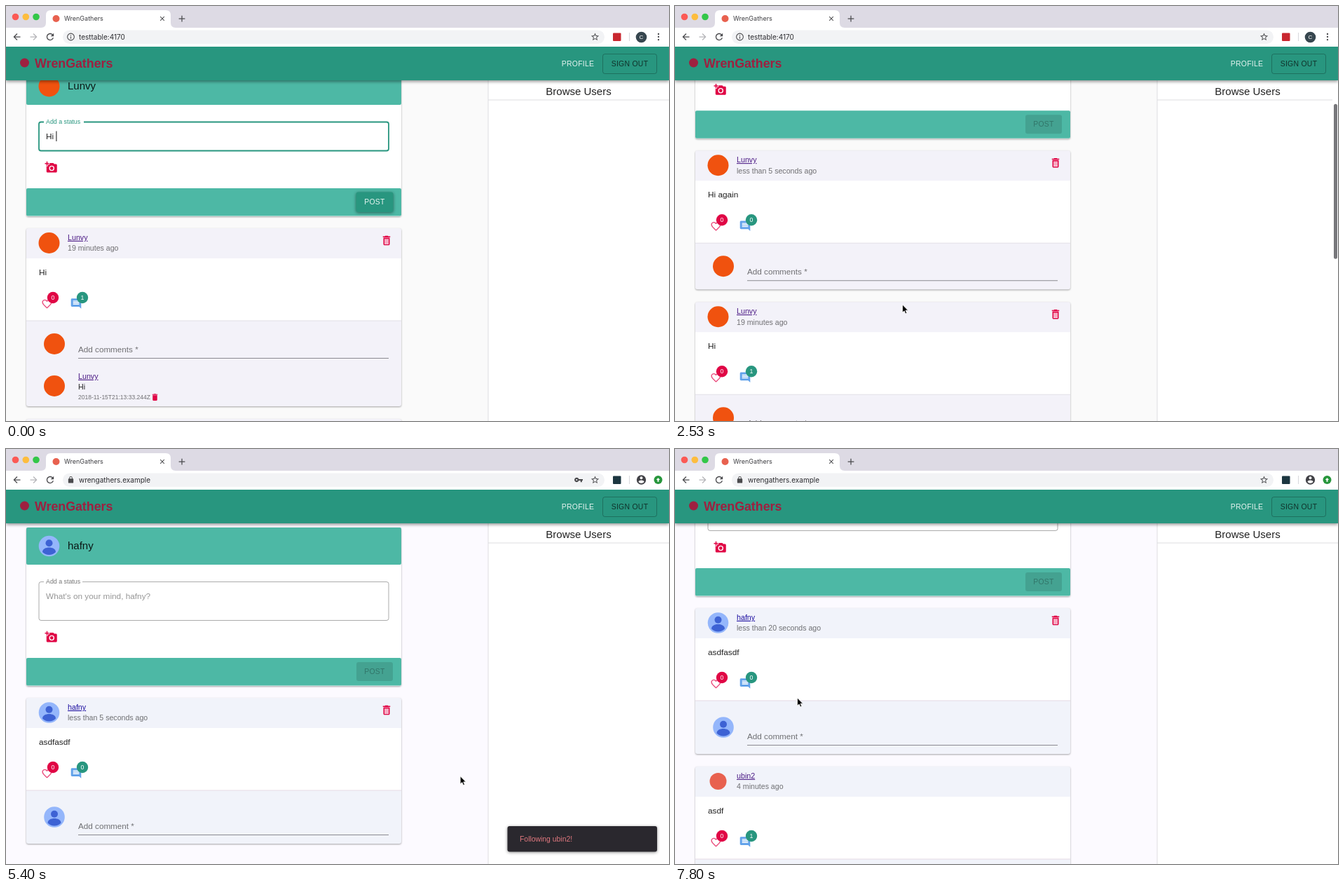
Recreate the animation shown at these times as an HTML page. Size 946x592 px, loop 8000 ms.

```html
<!DOCTYPE html>
<html lang="en">
<head>
<meta charset="utf-8">
<title>Feed</title>
<style>
html, body { margin: 0; height: 100%; overflow: hidden; background: #fff; }
svg { display: block; width: 100vw; height: 100vh; font-family: "Liberation Sans", Arial, sans-serif; }
text { white-space: pre; }
.ui { font-family: Inter, sans-serif; }
.card { filter: drop-shadow(0 1px 1px rgba(0,0,0,.35)); }
.raised { filter: drop-shadow(0 1px 2px rgba(0,0,0,.45)); }
.bar { filter: drop-shadow(0 2px 2px rgba(0,0,0,.4)); }
</style>
</head>
<body>
<svg id="stage" viewBox="0 0 946 592"></svg>
<script>
const LOOP = 8000, CUT = 2700, POSTED = 1330, FOLLOWED = 3800, RELOAD = 5500, BLANK = 6000, LOADED = 6200;
const TEAL = '#28967f', MINT = '#4db8a5', PINK = '#e00545', INK = 'rgba(0,0,0,.87)', GREY = 'rgba(0,0,0,.54)';
const BRAND = 'WrenGathers', SITE = 'wrengathers.example';
const stage = document.getElementById('stage');

const users = {
  lunvy: { name: 'Lunvy', link: '#4b1a85', dot: '#f0520f' },
  hafny: { name: 'hafny', link: '#1d0fa0' },
  ubin2: { name: 'ubin2', link: '#4b1a85', dot: '#e8614f' }
};

// 24-unit icons
const icons = {
  back: 'M20 11H7.83l5.59-5.59L12 4l-8 8 8 8 1.41-1.41L7.83 13H20v-2z',
  next: 'M4 11h12.17l-5.59-5.59L12 4l8 8-8 8-1.41-1.41L16.17 13H4v-2z',
  reload: 'M17.65 6.35C16.2 4.9 14.21 4 12 4c-4.42 0-7.99 3.58-7.99 8s3.57 8 7.99 8c3.73 0 6.84-2.55 7.73-6h-2.08c-.82 2.33-3.04 4-5.65 4-3.31 0-6-2.69-6-6s2.69-6 6-6c1.66 0 3.14.69 4.22 1.78L13 11h7V4l-2.35 2.35z',
  close: 'M19 6.41L17.59 5 12 10.59 6.41 5 5 6.41 10.59 12 5 17.59 6.41 19 12 13.41 17.59 19 19 17.59 13.41 12z',
  plus: 'M19 13h-6v6h-2v-6H5v-2h6V5h2v6h6v2z',
  info: 'M11 17h2v-6h-2v6zm1-15a10 10 0 1 0 0 20 10 10 0 0 0 0-20zm0 18a8 8 0 1 1 0-16 8 8 0 0 1 0 16zM11 9h2V7h-2v2z',
  lock: 'M18 8h-1V6a5 5 0 0 0-10 0v2H6c-1.1 0-2 .9-2 2v10c0 1.1.9 2 2 2h12c1.1 0 2-.9 2-2V10c0-1.1-.9-2-2-2zM15 8H9V6a3 3 0 0 1 6 0v2z',
  star: 'M22 9.24l-7.19-.62L12 2 9.19 8.63 2 9.24l5.46 4.73L5.82 21 12 17.27 18.18 21l-1.63-7.03L22 9.24zM12 15.4l-3.76 2.27 1-4.28-3.32-2.88 4.38-.38L12 6.1l1.71 4.04 4.38.38-3.32 2.88 1 4.28L12 15.4z',
  key: 'M12.65 10C11.83 7.67 9.61 6 7 6c-3.31 0-6 2.69-6 6s2.69 6 6 6c2.61 0 4.83-1.67 5.65-4H17v4h4v-4h2v-4H12.65zM7 14c-1.1 0-2-.9-2-2s.9-2 2-2 2 .9 2 2-.9 2-2 2z',
  account: 'M12 2a10 10 0 1 0 0 20 10 10 0 0 0 0-20zm0 3a3 3 0 1 1 0 6 3 3 0 0 1 0-6zm0 14.2c-2.5 0-4.71-1.28-6-3.22.03-1.99 4-3.08 6-3.08 1.99 0 5.97 1.09 6 3.08-1.29 1.94-3.5 3.22-6 3.22z',
  dots: 'M12 3a2 2 0 1 0 0 4 2 2 0 0 0 0-4zm0 7a2 2 0 1 0 0 4 2 2 0 0 0 0-4zm0 7a2 2 0 1 0 0 4 2 2 0 0 0 0-4z',
  up: 'M4 12l8-8 8 8h-5v8H9v-8z',
  bin: 'M6 19c0 1.1.9 2 2 2h8c1.1 0 2-.9 2-2V7H6v12zM19 4h-3.5l-1-1h-5l-1 1H5v2h14V4z',
  binLine: 'M6 19c0 1.1.9 2 2 2h8c1.1 0 2-.9 2-2V7H6v12zM8 9h8v10H8V9zm7.5-5l-1-1h-5l-1 1H5v2h14V4z',
  heart: 'M16.5 3c-1.74 0-3.41.81-4.5 2.09C10.91 3.81 9.24 3 7.5 3 4.42 3 2 5.42 2 8.5c0 3.78 3.4 6.86 8.55 11.54L12 21.35l1.45-1.32C18.6 15.36 22 12.28 22 8.5 22 5.42 19.58 3 16.5 3zm-4.4 15.55l-.1.1-.1-.1C7.14 14.24 4 11.39 4 8.5 4 6.5 5.5 5 7.5 5c1.54 0 3.04.99 3.57 2.36h1.87C13.46 5.99 14.96 5 16.5 5c2 0 3.5 1.5 3.5 3.5 0 2.89-3.14 5.74-7.9 10.05z',
  chat: 'M21.99 4c0-1.1-.89-2-1.99-2H4c-1.1 0-2 .9-2 2v12c0 1.1.9 2 2 2h14l4 4-.01-18zM18 14H6v-2h12v2zm0-3H6V9h12v2zm0-3H6V6h12v2z',
  camera: 'M3 4V1h2v3h3v2H5v3H3V6H0V4h3zm3 6V7h3V4h7l1.83 2H21c1.1 0 2 .9 2 2v12c0 1.1-.9 2-2 2H5c-1.1 0-2-.9-2-2V10h3zm7 9a5 5 0 1 0 0-10 5 5 0 0 0 0 10zm-3.2-5a3.2 3.2 0 1 0 6.4 0 3.2 3.2 0 0 0-6.4 0z',
  badge: 'M3 5v14c0 1.1.89 2 2 2h14c1.1 0 2-.9 2-2V5c0-1.1-.9-2-2-2H5c-1.11 0-2 .9-2 2zm12 4a3 3 0 1 1-6 0 3 3 0 0 1 6 0zm-9 8c0-2 4-3.1 6-3.1s6 1.1 6 3.1v1H6v-1z'
};

const rect = (x, y, w, h, fill, more = '') => `<rect x="${x}" y="${y}" width="${w}" height="${h}" fill="${fill}" ${more}/>`;
const disc = (x, y, r, fill) => `<circle cx="${x}" cy="${y}" r="${r}" fill="${fill}"/>`;
// y is the middle of the capitals
const text = (x, y, s, size, fill = INK, more = '') =>
  `<text x="${x}" y="${y + size * .36}" font-size="${size}" fill="${fill}" ${more}>${s}</text>`;
const caps = (x, y, s, fill) => text(x, y, s, 10.4, fill, 'letter-spacing=".3" text-anchor="middle"');
const icon = (name, x, y, size, fill) =>
  `<path d="${icons[name]}" fill="${fill}" fill-rule="evenodd" transform="translate(${x - size / 2} ${y - size / 2}) scale(${size / 24})"/>`;

const pen = document.createElement('canvas').getContext('2d');
const measure = (s, size) => {
  pen.font = `${size}px "Liberation Sans", Arial, sans-serif`;
  return pen.measureText(s).width;
};

const ramp = (t, a, b) => Math.min(1, Math.max(0, (t - a) / (b - a)));
const ease = k => k * k * (3 - 2 * k);
// keys: [time, ...values]
function track(t, keys, curve = ease) {
  let i = 0;
  while (i < keys.length - 2 && t >= keys[i + 1][0]) i++;
  const [a, b] = [keys[i], keys[i + 1]], k = curve(ramp(t, a[0], b[0]));
  return a.slice(1).map((v, j) => v + (b[j + 1] - v) * k);
}

function avatar(user, x, y) {
  if (user.dot) return disc(x, y, user === users.ubin2 ? 12 : 15, user.dot);
  return `<g transform="translate(${x} ${y})">${disc(0, 0, 14.8, '#94b6fb')}${disc(0, -4.3, 5, '#3d62d4')}
    <path d="M-9.5 8.5c0-4.500 5-6.500 9.500-6.500s9.500 2 9.500 6.500q-4 4-9.500 4t-9.500-4z" fill="#3d62d4"/></g>`;
}

const badge = (x, y, n, fill) => disc(x, y, 8.2, fill) + text(x, y, n, 8.8, '#fff', 'text-anchor="middle"');

// y is the lower edge of the coloured head
function composer(y, user, s) {
  const grow = s.local ? 0 : 14, h = 41 + grow, foot = y + 119 + grow, mid = foot + 19.5;
  const line = s.focus ? TEAL : s.hover ? '#333' : 'rgba(0,0,0,.33)';
  const gap = 54 + (s.focus ? 57 : 55);
  return rect(29, y - 53, 535, 212 + grow, '#fff', 'rx="3" class="card"') +
    rect(29, y - 53, 535, 53, MINT, 'rx="2"') + avatar(user, 61.5, y - 26.5) + text(88, y - 27, user.name, 15) +
    rect(47, y + 24.5, 499, h, 'none', `rx="3" stroke="${line}" stroke-width="${s.focus ? 1.8 : 1}"`) +
    rect(54, y + 22, gap - 54, 5, '#fff') + text(57, y + 24, 'Add a status', 8.85, s.focus ? TEAL : GREY) +
    (s.typed ? text(57, y + 44.5, s.typed, 11.8) : text(57, y + 44.5, `What's on your mind, ${user.name}?`, 11.8, 'rgba(0,0,0,.42)')) +
    (s.caret ? rect(57 + measure(s.typed, 11.8), y + 37.5, 1, 14.5, '#111') : '') +
    icon('camera', 64.5, y + 89 + grow, 18, PINK) +
    rect(29, foot, 535, 39.5, MINT, 'rx="2"') +
    (s.typed
      ? rect(499.5, mid - 14, 53, 28.5, s.press ? '#1d6d5d' : TEAL, 'rx="3" class="raised"') + caps(526, mid - .5, 'POST', '#e8f5f2')
      : rect(500, mid - 13.5, 52, 27, 'rgba(0,0,0,.12)', 'rx="3"') + caps(526, mid - .5, 'POST', 'rgba(0,0,0,.28)'));
}

const tail = (p, local) => (local ? 66 : 76) + (p.reply ? 56 : 0);

function post(y, p, me, local) {
  const user = p.user, body = y + 43, foot = y + 132, d = local ? 0 : 10, tint = local ? '#f3f2f9' : '#f1f3fa';
  const link = (x, ly) => text(x, ly, user.name, 10.7, user.link, 'text-decoration="underline"');
  let out = rect(29, y, 535, 132 + tail(p, local), tint, 'rx="3" class="card"') +
    rect(29, body, 535, 89, '#fff') + rect(29, foot - .5, 535, 1, local ? '#e2e0e8' : '#e6d9e6') +
    avatar(user, 61.5, y + 21) + link(88, y + 13) +
    text(88, y + 28.5, p.when, 10.6, GREY) + text(47, body + 20, p.body, 11.8) +
    icon('heart', 58.5, body + 65, 17, '#ea4b7c') + badge(67, body + 56, 0, PINK) +
    icon('chat', 100, body + 64.5, 17.5, '#62a2ea') + badge(109, body + 56, p.reply ? 1 : 0, TEAL) +
    avatar(me, 69, foot + 33 + d / 2) + text(103, foot + 41 + d, local ? 'Add comments *' : 'Add comment *', 11.7, GREY) +
    rect(103, foot + 53 + d, 443, 1, '#8b8a90');
  if (user === me) out += rect(539, y + 12, 8, 10, '#f7a8c0') + icon('binLine', 543, y + 17.500, 18, PINK);
  if (p.reply) out += avatar(me, 69, foot + 93) + link(103, foot + 79) + text(103, foot + 94.5, p.reply, 10.6) +
    text(103, foot + 109, '2018-11-15T21:13:33.244Z', 8.5, GREY) + icon('bin', 212.5, foot + 109, 13, PINK);
  return out;
}

function feed(scroll, me, posts, s) {
  const head = 228 - scroll;
  let y = head + (s.local ? 176 : 190);
  let out = text(296, head - 79, 'Post Feed', 25.4, TEAL, 'text-anchor="middle"') + composer(head, me, s);
  for (const p of posts) {
    out += post(y, p, me, s.local);
    y += 150 + tail(p, s.local);
  }
  return out;
}

const drawer = right => rect(688, 106, 258, 486, '#fff') + rect(687.5, 106, 1, 486, '#dedde2') +
  text(817, 121.5, 'Browse Users', 15, INK, 'text-anchor="middle"') + rect(688, 133.5, right - 688, 1, '#dedde2');

function suggestion(hover) {
  return avatar(users.ubin2, 721, 161) + text(753, 161, users.ubin2.name, 11.8) + icon('badge', 847, 161, 18, PINK) +
    rect(865, 148, 70, 28, hover ? '#1d6d5d' : TEAL, 'rx="3" class="raised"') + caps(900, 161.500, 'FOLLOW', '#e8f5f2');
}

function browser(t, local) {
  const busy = t >= RELOAD && t < 6150, fresh = t >= 5950 && t < 6230, dark = '#4a4a4d';
  let out = rect(0, 0, 946, 32, '#dddae4') + rect(0, 31, 946, 27, '#fff') +
    '<path d="M50 31q7 0 7-7V13q0-7 7-7h164q7 0 7 7v11q0 7 7 7z" fill="#fff"/>' +
    disc(13.5, 15.5, 4.8, '#fb5a55') + disc(28.3, 15.5, 4.8, '#fdbd3e') + disc(43, 15.5, 4.8, '#33c748') +
    (fresh ? rect(66, 13, 11, 11, '#cfe2f8', 'rx="2"') + disc(68, 22, 1.8, '#3f7fe0') : disc(71.5, 18, 5, '#e8614f')) +
    text(83, 18, BRAND, 9, '#3c3c40', 'class="ui"') + icon('close', 223, 18, 11, dark) + icon('plus', 251, 18, 15, dark) +
    icon('back', 15.5, 44, 15, dark) + icon('next', 39.5, 44, 15, '#b4b4b8') +
    icon(busy ? 'close' : 'reload', 63, 44, 15.5, dark) +
    rect(81, 34.5, 773, 19.5, '#f2f3f5', 'rx="9.7"') +
    icon(local ? 'info' : 'lock', 92.5, 44, local ? 13 : 11, dark) +
    text(104, 44, local ? 'testtable:4170' : SITE, 10, '#2c2c30', 'class="ui"') +
    icon('star', 840.5, 44, 13.5, dark) + rect(889, 38, 1, 12, '#d8d8dc');
  if (local) return out + rect(866, 38.5, 11.5, 11.5, '#c9272f', 'rx="1"') + disc(906.5, 44.5, 7.8, '#37474f') +
    text(906.5, 44.5, 'C', 8, '#fff', 'text-anchor="middle"') + icon('dots', 931, 44, 14, dark);
  return out + (t < BLANK ? icon('key', 817, 44, 13, dark) : '') +
    rect(866, 38.5, 11.5, 11.5, fresh ? '#e9e9ec' : '#1c3640', 'rx="1"') +
    icon('account', 906.5, 44, 16, '#414146') + disc(930.5, 44, 6, '#27963c') + icon('up', 930.5, 44, 8, '#fff');
}

const appBar = rect(0, 58, 946, 48, TEAL, 'class="bar"') + disc(26.5, 81, 6.5, '#9e2040') +
  text(41, 82, BRAND, 17.8, '#9e2040', 'font-weight="bold"') + caps(816, 82, 'PROFILE', '#e8f5f2') +
  rect(851.5, 68.5, 77, 28, 'none', 'rx="3" stroke="rgba(0,0,0,.25)"') + caps(890, 82, 'SIGN OUT', '#10312a');

function pointer(x, y, kind) {
  const shape = {
    arrow: '<path d="M0 0v11.300l2.600-2.400 1.800 4 1.900-.8-1.700-3.900h3.500z" fill="#000" stroke="#fff" stroke-width=".8"/>',
    beam: '<path d="M-2.500-5.500q2.500 0 2.500 1.500v8q0 1.500-2.500 1.500m5-11q-2.500 0-2.500 1.500m0 8q0 1.500 2.500 1.500M-1 1.500h2" fill="none" stroke="#111"/>',
    hand: '<path d="M-1 0q1-1.500 2 0v5l5 1q1.500.5 1 3l-1 4h-6l-4-5q0-1.500 1.500-1l1.500 1z" fill="#fff" stroke="#000" stroke-width=".9"/>'
  };
  return `<g transform="translate(${x} ${y})">${shape[kind]}</g>`;
}

const scrollBar = (scroll, size, alpha) =>
  rect(940, 58 + scroll * size / 534, 5, size, '#77777b', `rx="2.5" opacity="${alpha}"`);

function localScene(t) {
  const me = users.lunvy, done = t >= POSTED;
  const letters = 3 + Math.max(0, Math.min(5, Math.floor((t - 70) / 80) + 1));
  const [scroll] = track(t, [[2200, 87], [2270, 99], [2480, 185], [2680, 235]], k => k);
  const [mx, my] = track(t, [[600, 579, 364], [850, 527, 277], [1300, 527, 277], [1850, 324.5, 426]]);
  const moving = t >= 2200;
  const s = {
    local: true, typed: done ? '' : 'Hi again'.slice(0, letters),
    focus: t < 1120, caret: t < 930, press: t >= 800 && !done
  };
  const posts = [
    { user: me, when: '19 minutes ago', body: 'Hi', reply: 'Hi' },
    { user: me, when: '21 minutes ago', body: 'Hello' }
  ];
  if (done) posts.unshift({ user: me, when: 'less than 5 seconds ago', body: 'Hi again' });
  return rect(0, 58, 946, 534, '#fafafa') + feed(scroll, me, posts, s) + drawer(moving ? 938 : 946) +
    appBar + browser(t, true) + (moving ? scrollBar(scroll, 221, 1) : '') +
    (t > 580 ? pointer(mx, my, s.press && t < 1300 ? 'hand' : 'arrow') : '');
}

function siteScene(t) {
  const me = users.hafny, again = t >= LOADED;
  const [mx, my] = track(t, [[CUT, 440, 520], [3000, 500, 300], [3270, 522, 220], [3400, 560, 212], [3630, 900, 163],
    [3760, 900, 163], [4180, 659, 445], [5270, 659, 445], [5550, 635, 493], [7050, 635, 493], [7780, 174.5, 355]]);
  const scroll = again ? track(t, [[6250, 0], [6400, 49], [6700, 140], [7100, 191]], k => k)[0] : 63;
  const bar = t > 6250 ? 1 - ramp(t, 7300, 7550) : 0;
  const hover = mx > 47 && mx < 546 && my > 189 && my < 244 && !again;
  const onButton = mx > 865 && my < 176 && t < FOLLOWED;
  const posts = [{ user: me, when: `less than ${again ? 20 : 5} seconds ago`, body: 'asdfasdf' }];
  if (again) posts.push({ user: users.ubin2, when: '4 minutes ago', body: 'asdf', reply: 'asdf' });

  let out = rect(0, 58, 946, 534, '#fcfaff');
  if (t >= BLANK && !again) {
    const arc = 6 + 90 * ramp(t, 6080, 6400);
    out += `<circle cx="511" cy="346" r="15" fill="none" stroke="#d8476f" stroke-width="1.6"
      stroke-dasharray="${arc} 200" transform="rotate(-101 511 346)"/>`;
  } else {
    out += feed(scroll, me, posts, { hover }) + drawer(bar ? 938 : 946);
    if (t < FOLLOWED) out += suggestion(onButton);
  }
  out += appBar + browser(t, false) + (bar ? scrollBar(scroll, 322, bar) : '');
  if (t >= FOLLOWED && t < BLANK) out += `<g opacity="${ramp(t, FOLLOWED, FOLLOWED + 200)}">` +
    rect(715.5, 538, 213.5, 36.5, '#2a282e', 'rx="3" class="raised"') +
    text(733, 556, `Following ${users.ubin2.name}!`, 10.4, '#e0787f') + '</g>';
  if (t >= RELOAD && t < 6150) out +=
    '<path d="M-1 593V577h311q4 0 4 4v12z" fill="#fff" stroke="#a9a8ad"/>' +
    text(2, 584.5, `Waiting for ${SITE}...`, 9.3, '#55555a');
  return out + pointer(mx, my, onButton ? 'hand' : hover ? 'beam' : 'arrow');
}

function frame(now) {
  const t = now % LOOP;
  stage.innerHTML = t < CUT ? localScene(t) : siteScene(t);
  requestAnimationFrame(frame);
}
frame(0);
</script>
</body>
</html>
```
